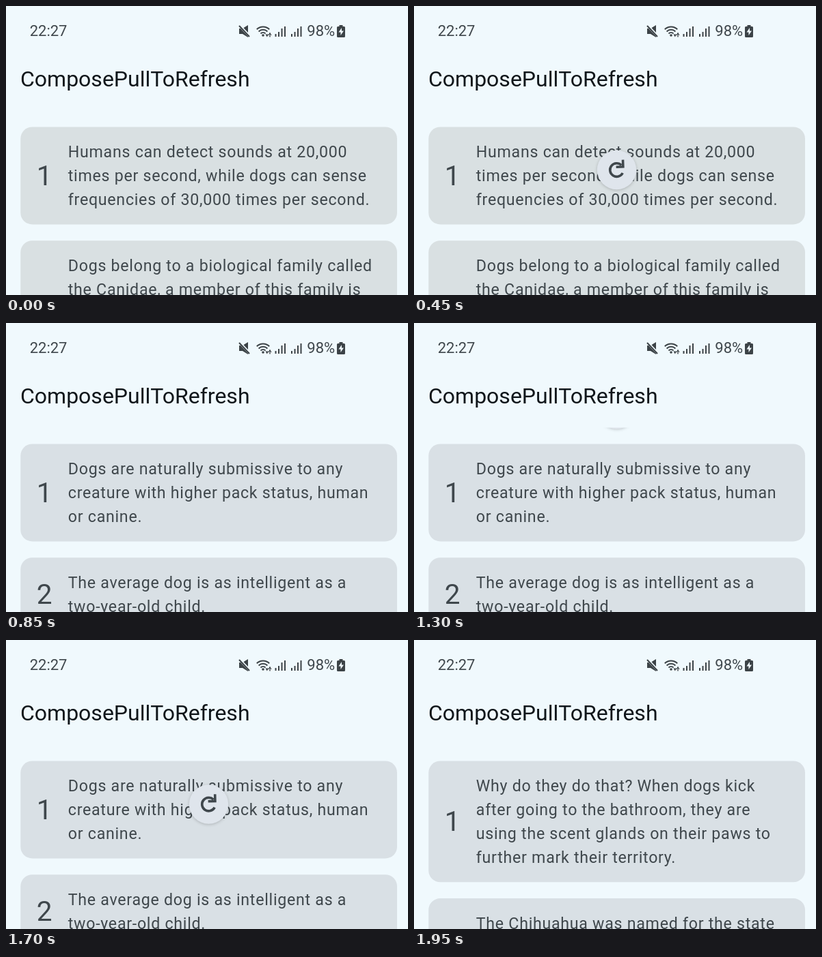
Animation, 588 px wide and 424 px high, one loop 2.2 s. Source, as an HTML page:

```html
<!DOCTYPE html>
<html lang="en">
<head>
<meta charset="utf-8">
<title>Pull to refresh</title>
<style>
  html, body { margin: 0; height: 100%; overflow: hidden; background: #f0f9fd; }
  svg { display: block; width: 100vw; height: 100vh; }
  text { font-family: Roboto, sans-serif; fill: #3f474c; }
  .status { font-size: 22px; }
  .title { font-size: 32px; fill: #10161a; }
  .body { font-size: 23.2px; letter-spacing: .72px; }
  .num { font-size: 40.5px; text-anchor: middle; }
  .card { fill: #d9e0e5; }
  #lists g:first-child .card { fill: #d9e0e2; }
  .icon { fill: #3c4347; }
  .line { fill: none; stroke: #3c4347; stroke-width: 2; }
  .mark { fill: none; stroke: #3f474c; stroke-width: 3.6; }
  #disc { fill: #dfe5ec; filter: drop-shadow(0 1.5px 2px rgba(0, 0, 0, .2)); }
</style>
</head>
<body>
<svg id="stage" viewBox="0 0 588 424">
  <clipPath id="below"><rect y="153.5" width="588" height="271"/></clipPath>

  <text class="status" x="34.7" y="43.8">22:27</text>
  <text class="status" x="440.3" y="43.8">98%</text>
  <path class="icon" d="M341 33h5l8-5v18l-8-5h-5z"/>
  <path d="M341 28l16 17" stroke="#f0f9fd" stroke-width="4"/>
  <path class="line" d="M341 29l15 16"/>
  <path class="line" d="M366.8 34.3a13 13 0 0 1 18.4 0M369.6 37.500a9 9 0 0 1 12.8 0M372.5 40.500a5 5 0 0 1 7 0"/>
  <circle class="icon" cx="376" cy="43" r="1.8"/>
  <path class="icon" d="M379.500 41.500h4.500l-2.250 4zM383.500 43h5l-2.500-4.500zM385.300 42h1.400v3.500h-1.400z"/>
  <g id="bars" class="icon"></g>
  <path class="icon" d="M487.5 28h5v2h2q1.5 0 1.5 1.5v13q0 1.5-1.5 1.5h-9q-1.5 0-1.5-1.5v-13q0-1.5 1.5-1.5h2z"/>
  <path d="M491 32l-4.5 6.5h3v4.5l4.5-6.5h-3z" fill="#f0f9fd"/>

  <text class="title" x="21" y="117.6">ComposePullToRefresh</text>
  <g id="lists"></g>

  <g clip-path="url(#below)">
    <g id="puller">
      <circle id="disc" r="28.7"/>
      <g id="arrow" class="mark"><path id="arc"/><path id="head"/></g>
      <path id="spinner" class="mark"/>
    </g>
  </g>
</svg>
<script>
const LOOP = 2200, STEP = 50;
const REST = 240.5, HIDDEN = 125, R = 9.8;
const $ = id => document.getElementById(id);

// Each list: cards as [line count, visible lines]
const lists = [
  [[3, ["Humans can detect sounds at 20,000", "times per second, while dogs can sense",
        "frequencies of 30,000 times per second."]],
   [5, ["Dogs belong to a biological family called", "the Canidae, a member of this family is"]]],
  [[3, ["Dogs are naturally submissive to any", "creature with higher pack status, human", "or canine."]],
   [2, ["The average dog is as intelligent as a", "two-year-old child."]]],
  [[4, ["Why do they do that? When dogs kick", "after going to the bathroom, they are",
        "using the scent glands on their paws to", "further mark their territory."]],
   [3, ["The Chihuahua was named for the state"]]]
];

function listMarkup(cards) {
  let y = 177.5, out = "";
  cards.forEach(([count, lines], i) => {
    const h = 38.2 + 34.9 * count;
    out += `<rect class="card" x="21.3" y="${y}" width="550.7" height="${h}" rx="17"/>`
         + `<text class="num" x="56.2" y="${y + h / 2 + 14}">${i + 1}</text>`;
    lines.forEach((s, n) => {
      out += `<text class="body" x="90.8" y="${y + 44.5 + 34.9 * n}">${s}</text>`;
    });
    y += h + 23.8;
  });
  return `<g>${out}</g>`;
}
$("lists").innerHTML = lists.map(listMarkup).join("");
$("bars").innerHTML = [393.5, 417].map(x => [4, 7, 12, 15].map((h, i) =>
  `<rect x="${x + 4.5 * i}" y="${45 - h}" width="2" height="${h}"/>`).join("")).join("");

// Rows: time, centre y, arrow opacity
const pulls = [
  { refresh: 600, rows: [[150, 215, .3], [200, 316, .35], [250, 334, .6], [300, 338, .8], [350, 322, 1],
    [400, 258, 1], [450, REST, 1], [500, REST, .7], [600, REST, .04], [650, 212, 0], [700, 158, 0], [750, 95, 0]] },
  { refresh: 1800, rows: [[1300, 126.5, .3], [1350, 200, .3], [1400, 268, .35], [1450, 312, .55], [1500, 330, .75],
    [1550, 334, 1], [1600, 310, 1], [1650, 254, 1], [1700, 241, 1], [1750, REST, .6], [1800, REST, .04],
    [1850, 212, 0], [1900, 158, 0], [1950, 95, 0]] }
];

function sample(rows, t) {
  const i = rows.findIndex(r => r[0] > t);
  if (i < 1) return null;
  const a = rows[i - 1], b = rows[i], k = (t - a[0]) / (b[0] - a[0]);
  return a.map((v, n) => v + (b[n] - v) * k);
}

function arcPath(from, sweep) {
  const at = deg => {
    const a = deg * Math.PI / 180;
    return `${R * Math.cos(a)} ${R * Math.sin(a)}`;
  };
  return `M${at(from)}A${R} ${R} 0 ${sweep > 180 ? 1 : 0} 1 ${at(from + sweep)}`;
}

// The arc grows up to the threshold, then turns with the overpull
function drawArrow(y) {
  const progress = (y - HIDDEN) / (REST - HIDDEN);
  const grown = Math.max(Math.min(1, progress) - .4, 0) * 5 / 3;
  const turn = (-.25 + .4 * grown) * 180 + Math.max(0, progress - 1) * 140;
  const sweep = 288 * grown, w = 7.25 * grown;
  $("arc").setAttribute("d", arcPath(turn, sweep));
  $("head").setAttribute("d", grown ? `M${R - w} -3.6l${w} ${w}l${w} ${-w}` : "");
  $("head").setAttribute("transform", `rotate(${turn + sweep - 2})`);
}

function draw(t) {
  const shown = pulls.filter(p => t >= p.refresh).length;
  [...$("lists").children].forEach((g, i) => g.style.display = i === shown ? "" : "none");

  const pull = pulls.find(p => sample(p.rows, t));
  $("puller").style.display = pull ? "" : "none";
  if (!pull) return;
  const [, y, alpha] = sample(pull.rows, t);
  $("puller").setAttribute("transform", `translate(296.5 ${y})`);
  $("arrow").setAttribute("opacity", alpha);
  drawArrow(y);
  const spin = t - pull.refresh;
  $("spinner").setAttribute("d", spin < 0 ? "" : arcPath(-74 + .15 * spin, 28 + .3 * spin));
}

const start = performance.now();
function tick() {
  const t = (performance.now() - start) % LOOP;
  draw(Math.floor(t / STEP) * STEP);
  requestAnimationFrame(tick);
}
tick();
</script>
</body>
</html>
```
